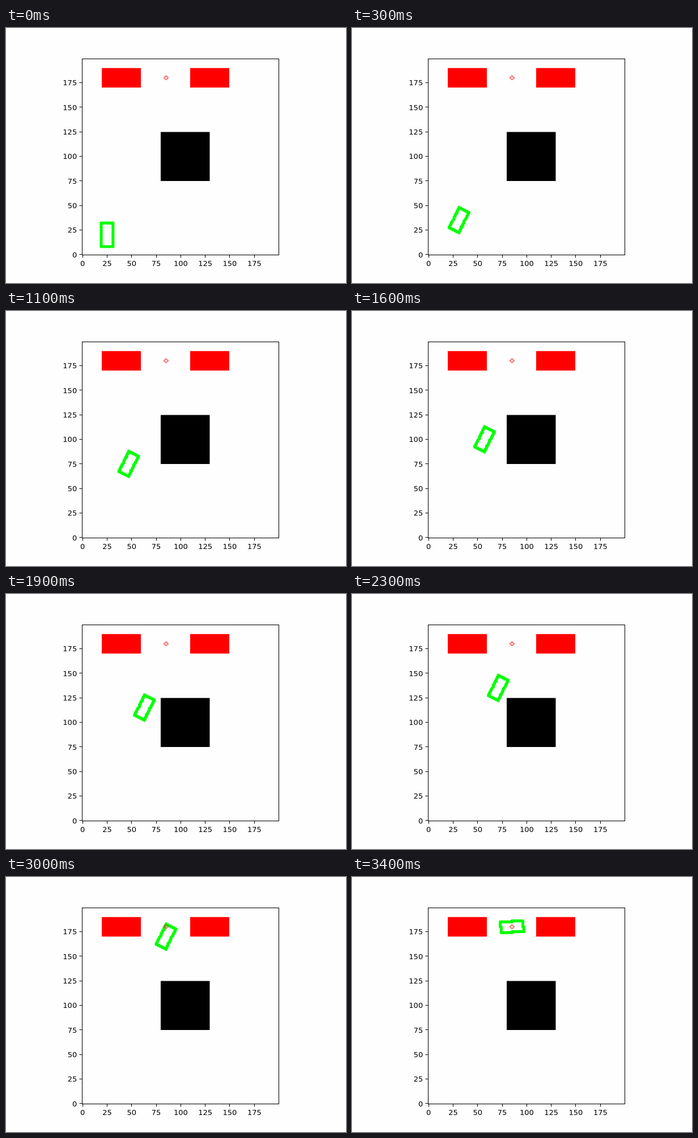
Animation of 600 by 450 pixels, one loop 3500 ms. Source, as an HTML page:

```html
<!DOCTYPE html>
<html lang="en">
<head>
<meta charset="utf-8">
<title>Parking path</title>
<style>
  html, body { margin: 0; width: 100%; height: 100%; overflow: hidden; background: #fefefe; }
  svg { display: block; width: 600px; height: 450px; }
  text { font: 13.02px "DejaVu Sans", sans-serif; fill: #000; }
  .axis { fill: none; stroke: #000; stroke-width: 1.04; }
  #car { fill: none; stroke: #0f0; stroke-width: 5.2; stroke-linecap: round; }
  #goal { fill: #fb2323; }
</style>
</head>
<body>
<svg viewBox="0 0 600 450">
  <rect x="169" y="70.7" width="69" height="34.4" fill="#f00"/>
  <rect x="325" y="70.7" width="69" height="34.4" fill="#f00"/>
  <rect x="273" y="183.5" width="86.5" height="86.5"/>
  <path id="car"/>
  <path id="goal"/>
  <rect class="axis" x="134.5" y="54.5" width="347" height="346"/>
  <path id="ticks" class="axis"/>
  <g id="labels"></g>
</svg>
<script>
  const STEP = 100, STEPS = 35;
  const UNIT = 346.5 / 200;
  const get = id => document.getElementById(id);
  const px = x => 134.25 + (x + 0.5) * UNIT;
  const py = y => 400.5 - (y + 0.5) * UNIT;

  function addLabel(text, x, y, anchor) {
    const el = document.createElementNS("http://www.w3.org/2000/svg", "text");
    el.setAttribute("x", x);
    el.setAttribute("y", y);
    el.setAttribute("text-anchor", anchor);
    el.textContent = text;
    get("labels").append(el);
  }

  function drawAxes() {
    let d = "";
    for (let v = 0; v < 200; v += 25) {
      const x = Math.floor(px(v)) + 0.5, y = Math.floor(py(v)) + 0.5;
      d += `M${x} 400.5v5M134.5 ${y}h-5`;
      addLabel(v, px(v), 419.8, "middle");
      addLabel(v, 125.2, py(v) + 4.9, "end");
    }
    get("ticks").setAttribute("d", d);
  }

  // Ring of grid cells around the parking spot
  function drawGoal() {
    let d = "";
    for (let i = -2; i <= 2; i++) {
      for (let j = -2; j <= 2; j++) {
        if (Math.abs(i) + Math.abs(j) !== 2) continue;
        d += `M${px(84.5 + i)} ${py(180.5 + j)}h${UNIT}v${UNIT}h${-UNIT}z`;
      }
    }
    get("goal").setAttribute("d", d);
  }

  // Outline points of the car, 12 wide and 24 long, one unit apart
  const outline = [];
  for (let v = -12; v <= 12; v++) outline.push([-6, v], [6, v]);
  for (let u = -5; u <= 5; u++) outline.push([u, -12], [u, 12]);

  // Clockwise tilt from upright, in degrees
  function tiltAt(k) {
    if (k === 0) return 0;
    return k < 33 ? 25 : k === 33 ? 57 : 88;
  }

  function carPath(k) {
    const cx = Math.min(25 + 2 * k, 85), cy = Math.min(20 + 5 * k, 180);
    const a = tiltAt(k) * Math.PI / 180, c = Math.cos(a), s = Math.sin(a);
    return outline.map(([u, v]) => {
      const x = cx + Math.trunc(u * c + v * s);
      const y = cy + Math.trunc(v * c - u * s);
      return `M${px(x).toFixed(2)} ${py(y).toFixed(2)}h0`;
    }).join("");
  }

  let shown = -1;
  function draw() {
    const k = Math.floor(performance.now() / STEP) % STEPS;
    if (k !== shown) {
      shown = k;
      get("car").setAttribute("d", carPath(k));
    }
    requestAnimationFrame(draw);
  }

  drawAxes();
  drawGoal();
  draw();
</script>
</body>
</html>
```
